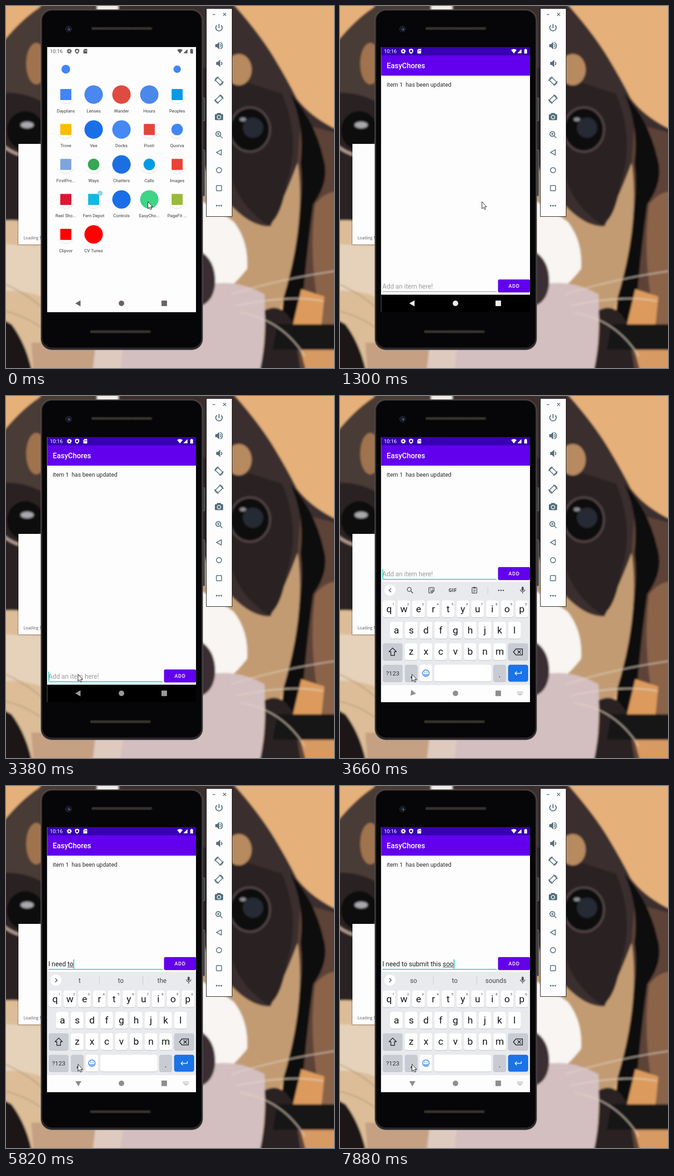
These frames come from a looping animation (713 px wide and 785 px high, 8 s). An HTML page:

```html
<!DOCTYPE html>
<html lang="en">
<head>
<meta charset="utf-8">
<title>To-do demo</title>
<style>
  html, body { margin: 0; width: 100%; height: 100%; overflow: hidden; background: #e6b07a; }
  svg { display: block; width: 713px; height: 785px; }
  text { font-family: Roboto, Arial, sans-serif; white-space: pre; }
  .mid { text-anchor: middle; }
  .bold { font-weight: 500; }
</style>
</head>
<body>
<svg id="stage" viewBox="0 0 713 785" xmlns="http://www.w3.org/2000/svg"></svg>
<script>
const LOOP = 8000;

// ---- markup helpers ----
const rect = (x, y, w, h, fill, r = 0, more = '') =>
  `<rect x="${x}" y="${y}" width="${w}" height="${h}" rx="${r}" fill="${fill}" ${more}/>`;
const disc = (x, y, r, fill, more = '') => `<circle cx="${x}" cy="${y}" r="${r}" fill="${fill}" ${more}/>`;
const oval = (x, y, rx, ry, fill, more = '') =>
  `<ellipse cx="${x}" cy="${y}" rx="${rx}" ry="${ry}" fill="${fill}" ${more}/>`;
const shape = (d, fill, more = '') => `<path d="${d}" fill="${fill}" ${more}/>`;
const line = (d, color, w = 1, more = '') => `<path d="${d}" fill="none" stroke="${color}" stroke-width="${w}" ${more}/>`;
const ring = (x, y, r, color, w, more = '') => disc(x, y, r, 'none', `stroke="${color}" stroke-width="${w}" ${more}`);
const text = (x, y, s, size, fill, more = '') => `<text x="${x}" y="${y}" font-size="${size}" fill="${fill}" ${more}>${s}</text>`;
const group = (id, ...parts) => `<g id="${id}">${parts.join('')}</g>`;
const at = (x, y, ...parts) => `<g transform="translate(${x} ${y})">${parts.join('')}</g>`;

// ---- wallpaper: flat tones of a dog's face ----
function wallpaper() {
  const black = '#0c0a0b', whisker = '#e6d8c6';
  return `<g filter="url(#soft)">` + [
    rect(-20, -20, 760, 830, '#e6b07a'),
    // left side of the head
    shape('M100-20L70 5Q25 35-20 95V480H100Z', '#4a3a35'),
    rect(75, -20, 125, 40, '#4a3a35'), rect(198, -20, 46, 40, '#f3ece6'), rect(244, -20, 188, 40, '#3a2d2a'),
    oval(66, 125, 22, 45, '#a0734f'),
    shape('M-20 190Q40 180 100 220V470H-20Z', '#2b2222'),
    oval(42, 270, 40, 42, black), oval(46, 258, 14, 7, '#a9a9ae'),
    line('M-10 300Q25 332 85 328', '#b59c90', 6),
    shape('M-20 468Q40 455 100 490V820H-20Z', '#dcbd98'),
    shape('M-20 515Q40 520 100 520V640Q40 610-20 620Z', '#e6d2ba'),
    shape('M-20 672L12 690Q50 740 62 820H-20Z', '#1c1716'),
    shape('M55 730H200V820H62Z', '#c5a082'), shape('M195 735H260L250 820H185Z', '#dfcabf'),
    // right side of the head
    shape('M420-20H480Q545 50 583 112Q612 160 632 200Q665 245 735 275V480H420Z', '#3a2e2d'),
    shape('M640 255L735 280V820H600Z', '#5d4338'),
    shape('M672 430Q700 395 735 405V700H690Q655 560 672 430Z', '#8b6348'),
    shape('M618 190Q650 260 640 340Q650 420 625 500Q602 600 598 705H640Q650 560 668 430Q705 380 690 330Q672 250 618 190Z', black),
    shape('M420 330Q500 480 575 478Q612 400 634 340Q648 440 622 560Q600 660 565 730L420 650Z', '#c29b72'),
    shape('M420 130Q520 165 600 190Q642 290 610 385Q598 460 570 475Q500 430 485 350L420 310Z', '#2a2122'),
    oval(506, 138, 28, 34, '#b78a61'),
    oval(530, 268, 44, 48, black, 'stroke="#54474a" stroke-width="4"'),
    disc(537, 264, 22, '#272a36'), oval(515, 246, 7, 4, '#8c8c96'),
    // muzzle, nose and collar
    shape('M420 420Q470 450 495 468Q528 510 524 570Q500 600 485 610L460 660H420Z', '#f8f5f2'),
    shape('M255 735H420V610Q490 585 562 625Q566 730 548 820H245Z', '#d3bfc0'),
    shape('M420 530Q456 550 455 600Q452 642 420 652Z', '#3b2d32'),
    shape('M562 660Q600 640 625 690L645 820H545Q568 730 562 660Z', '#2a2020'),
    shape('M642 614L692 630L686 690H624Z', '#dc9b5d'),
    shape('M590 690H735V745H580Z', '#191719'),
    shape('M640 746H735V820H660Z', '#d79a62'),
    line('M490 625Q600 590 735 572M500 650Q620 625 690 640M510 665Q600 680 650 760', whisker, 1.6),
    line('M-10 600Q40 620 80 655M-10 660Q40 670 80 700', '#a78a6e', 1.4)
  ].join('') + '</g>';
}

// ---- desktop windows around the handset ----
function sideWindow() {
  return rect(25, 299, 60, 220, '#00000030', 2) + rect(27, 299, 60, 218, '#fdfdfd') +
    text(38, 506, 'Loading N', 8.8, '#56565e', 'style="font-family:Open Sans,sans-serif"');
}

function toolbar() {
  const c = '#546e7a';
  const speaker = x => shape(`M${x} -3.2h3.6l5-5v16.4l-5-5h-3.6z`, c);
  const turn = dir => `<g transform="scale(${dir} 1)">` +
    rect(-4.2, -7.2, 8.4, 14.4, 'none', 1.2, `transform="rotate(-45)" stroke="${c}" stroke-width="1.7"`) +
    line('M-9.2 0A9.3 9.3 0 0 1-1-9.2M9.2 0A9.3 9.3 0 0 1 1 9.2', c, 1.5) + '</g>';
  const icons = [
    [47, line('M0-8V1M-4.6-5.2A7 7 0 1 0 4.6-5.2', c, 2)],
    [86, speaker(-8) + line('M2.5-3.2A3.6 3.6 0 0 1 2.5 3.2M2.5-7A7.4 7.4 0 0 1 2.5 7', c, 1.8)],
    [124.5, speaker(-6) + line('M4.4-3.2A3.6 3.6 0 0 1 4.4 3.2', c, 2)],
    [163, turn(1)], [202, turn(-1)],
    [240, rect(-9, -5.5, 18, 13, c, 2) + rect(-4.5, -8, 9, 4, c, 1.5) + ring(0, 1, 3.7, '#fdfdfd', 1.6)],
    [279, ring(-1.5, -1.5, 5.3, c, 1.9) + line('M2.5 2.5L7.5 7.5M-4-1.5h5M-1.5-4v5', c, 1.7)],
    [317.5, shape('M-5.5 0L5-5.8V5.8Z', 'none', `stroke="${c}" stroke-width="1.7" stroke-linejoin="round"`)],
    [356, ring(0, 0, 5.6, c, 1.7)],
    [395, rect(-5.6, -5.6, 11.2, 11.2, 'none', 1, `stroke="${c}" stroke-width="1.7"`)],
    [433, [-5, 0, 5].map(x => disc(x, 0, 1.8, c)).join('')]
  ];
  return rect(435.5, 5.5, 56, 451, '#fdfdfd', 0, 'stroke="#111"') +
    line('M449 18.5h6M472 15l6.4 6.4M478.4 15l-6.4 6.4', c, 1.4) +
    icons.map(([y, body]) => at(463, y, body)).join('');
}

function handset() {
  const grille = (x, y) => rect(x, y, 133, 7.5, '#1d1a19', 3) +
    line(`M${x + 2} ${y + 3.8}h129`, '#5a5048', 4.5, 'stroke-dasharray="1.2 1.6"');
  return rect(426, 199, 6, 50, '#3c3a3c', 1.5, 'stroke="#777"') + rect(426, 312, 6, 100, '#3c3a3c', 1.5, 'stroke="#777"') +
    rect(75.7, 7.7, 352, 738, '#2b282a', 24, 'stroke="#77717380" stroke-width="1.5"') +
    rect(79.5, 11, 344.5, 729, '#060507', 20, 'stroke="#000"') +
    disc(136, 50, 6.5, '#16161c', 'stroke="#2c2c33"') + disc(136.5, 50, 3, '#26345f') + disc(138, 51.5, 1, '#9aa7dd') +
    grille(185.5, 45) + grille(182.5, 702.5);
}

// ---- launcher; each entry is label, colour, kind (f full disc, d disc, s square) ----
const apps = ('Dayplans,4285f4,s|Lenses,4a87ee,f|Wander,df4b40,f|Hours,4c88ea,f|Peoples,039be5,s|' +
  'Trove,fbbc05,s|Vee,1a6fe8,f|Docks,4688f4,f|Postr,e5453a,s|Quorva,4285f4,d|' +
  'FirstPro...,7da5dc,s|Ways,34a853,d|Chatters,1a6fe3,f|Calls,039be5,d|Images,ea4335,s|' +
  'Reel Sho...,e21434,s|Fern Depot,10b9e2,s|Controls,1a6fe8,f|EasyCho...,3fd486,f|PageFit ...,99bb3c,s|' +
  'Clipvor,ff0000,s|CV Tunes,ff0000,f').split('|').map(s => s.split(','));

function launcher() {
  const tiles = apps.map(([label, color, kind], i) => {
    const x = 130 + 60.5 * (i % 5), y = 192 + 75.8 * Math.floor(i / 5), fill = '#' + color;
    const mark = kind === 'f' ? disc(0, 0, 20, fill) : kind === 'd' ? disc(0, 0, 12.5, fill) : rect(-12, -12, 24, 24, fill, 1);
    const edge = kind === 'f' ? '' : line('M-16.5 11A20 20 0 0 0 16.5 11', '#d8d8d8', 1);
    return at(x, y, `<g ${label.startsWith('EasyCho') ? 'id="pressed"' : ''}>${edge}${mark}</g>`,
      text(0, 38.6, label, 9.6, '#3a3a3a', 'class="mid"'));
  });
  return group('launcher', disc(130, 137, 9.5, '#4285f4'), disc(372, 137, 8, '#4285f4'),
    line('M125 154.5H375', '#ddd', 1, 'id="divider"'), ...tiles, disc(204.5, 406, 5.5, '#8dd3f3'));
}

function statusBar() {
  const c = 'currentColor';
  return group('status', text(95.5, 102, '10:16', 11.2, c),
    ring(137.5, 98, 2.9, c, 2.2), ring(137.5, 98, 4.6, c, 1.6, 'stroke-dasharray="2 1.6"'),
    shape('M154.5 92.5l4.6 1.8v3.5q0 3.8-4.6 5.7q-4.6-1.9-4.6-5.7v-3.5zM154.5 95.6a2.4 2.4 0 1 0 .1 0z', c, 'fill-rule="evenodd"'),
    shape('M171 93h5.4v10h-8.2v-7.2zM170.4 96v2h1v-2zM172.3 96v2h1v-2zM174.2 96v2h1v-2z', c, 'fill-rule="evenodd"'),
    shape('M372 95.5Q378 91 384 95.5L378 103Z', c),
    shape('M385.5 102.5L394.5 93.5V102.5Z', c), shape('M400.5 94.2h1.6v-1.2h2.8v1.2h1.6v8.8h-6z', c));
}

function navBar() {
  const c = 'currentColor';
  return group('nav', shape('M150.7 644.8L162 638.2V651.4Z', c, 'id="back"'),
    disc(251, 644.8, 6, c), rect(338, 638.8, 12, 12, c, 1),
    group('switcher', line('M385 641.5h12.5M385 644.5h12.5', c, 1.5, 'stroke-dasharray="1.5 1.25"'),
      line('M387.8 647.5h7', c, 1.5)));
}

// ---- keyboard ----
function keyboard() {
  const ink = '#15161a', soft = '#4d5156', grey = '#c8ccd2';
  const key = (x, y, w, fill = '#fff') => rect(x, y + 1, w, 36.5, '#b9bcc1', 4.5) + rect(x, y, w, 36.5, fill, 4.5);
  const row = (letters, x0, y) => [...letters].map((ch, i) => {
    const x = x0 + 32.05 * i;
    const hint = y < 450 ? text(x + 23, y + 10, (i + 1) % 10, 8, soft, 'class="mid"') : '';
    return key(x, y, 27.5) + hint + text(x + 13.8, y + 25, ch, 21, ink, 'class="mid letter"');
  }).join('');
  const tools = group('tools',
    line('M111 417l-4.2 4.2 4.2 4.2', soft, 1.6),
    ring(150.5, 419.5, 4.3, soft, 1.6), line('M153.8 422.8l4.8 4.8', soft, 1.8),
    line('M193 416.5q0-1 1-1h9.5q1 0 1 1v6l-4.5 4.5h-6q-1 0-1-1zM204.5 422h-4.5v5M196 422q2 3 4 1', soft, 1.4),
    disc(196.5, 419, 1, soft), disc(201, 419, 1, soft),
    text(245, 425, 'GIF', 10.5, soft, 'class="mid" font-weight="900" letter-spacing=".7"'),
    rect(287, 415.5, 10.5, 12, 'none', 1, `stroke="${soft}" stroke-width="1.4"`), rect(289.5, 414, 5.5, 3.5, soft, 1),
    line('M289.5 420.5h5.5M289.5 422.8h5.5M289.5 425h3.5', soft, 1),
    line('M321.5 413v17', '#c9ccd0'), ...[345, 350, 355].map(x => disc(x, 421.5, 1.6, soft)));
  const words = group('words', line('M107 417l4.2 4.2-4.2 4.2', soft, 1.6), line('M203 412v19M297.5 412v19', '#c4c7cb'),
    ...[160, 249.5, 339].map(x => text(x, 426.5, '', 14.1, '#45484c', 'class="mid word"')));
  return group('keyboard', rect(89, 403, 324, 224, '#e8eaed'), disc(108.5, 421, 12, '#fff'), tools, words,
    rect(394.7, 413.5, 4.6, 9, soft, 2.3), line('M392 419.5a5 5 0 0 0 10 0M397 424.5v4', soft, 1.4),
    row('qwertyuiop', 93, 443.5), row('asdfghjkl', 109, 489.8), row('zxcvbnm', 141, 536.2),
    key(93, 536.2, 43, grey), key(365.5, 536.2, 43.5, grey),
    shape('M114.5 546.5l8 8h-4v8h-8v-8h-4z', 'none', `id="shift" stroke="${ink}" stroke-width="1.4" stroke-linejoin="round"`),
    line('M377 555l5.5-6.5h14v13h-14zM386 551.5l7 7M393 551.5l-7 7', ink, 1.5),
    key(93, 582.8, 43, grey), key(141, 582.8, 27.5, grey), key(173, 582.8, 27.5), key(205, 582.8, 124),
    key(333.3, 582.8, 27.5, grey), key(365.5, 582.8, 43.5, '#1a73e8'),
    text(114.5, 606, '?123', 13.5, '#33363a', 'class="mid"'), text(155, 610, ',', 17, ink, 'class="mid"'),
    text(347, 610, '.', 17, ink, 'class="mid"'),
    ring(186.7, 601, 7, '#1a73e8', 1.5), disc(184.2, 599, 1.1, '#1a73e8'), disc(189.2, 599, 1.1, '#1a73e8'),
    line('M183 602.8a4 4 0 0 0 7.4 0', '#1a73e8', 1.5),
    line('M394 597v4.5h-13M384.5 597.5l-4 4 4 4', '#fff', 1.6));
}

function todoApp() {
  return group('app', rect(89, 89, 324, 575, '#fdfdfd'), rect(89, 89, 324, 18, '#3700b3'),
    rect(89, 626, 324, 38, '#000', 0, 'id="navBack"'),
    group('content', rect(89, 107, 324, 44, '#6200ee'), text(101.5, 135.4, 'EasyChores', 15.8, '#fff', 'class="bold"'),
      text(101.5, 175, 'item 1  has been updated', 12.55, '#2b2b2b'),
      group('entry', text(92, 613, 'Add an item here!', 14.1, '#9c9c9c', 'id="hint"'),
        text(92, 613, '', 14.15, '#1f1f1f', 'id="typed"'),
        rect(92, 614.3, 0, 1, '#333', 0, 'id="compose"'), rect(92.2, 598, 1.7, 20, '#12c7b4', 0, 'id="caret"'),
        rect(92.5, 619, 248, 1, '#8a8a8a', 0, 'id="rule"'),
        rect(344, 594, 69, 28, '#00000028', 3), rect(343.5, 593, 69.5, 28, '#6200ee', 3),
        text(378.6, 611.3, 'ADD', 11, '#fff', 'class="mid bold" letter-spacing="1"'))));
}

document.getElementById('stage').innerHTML =
  `<defs><filter id="soft" x="0" y="0" width="1" height="1"><feGaussianBlur stdDeviation="2"/></filter>
  <clipPath id="glass"><rect x="89.5" y="89" width="323.5" height="575"/></clipPath>
  <clipPath id="opening"><rect id="frame" rx="16"/></clipPath></defs>` +
  wallpaper() + sideWindow() + handset() + toolbar() +
  `<g clip-path="url(#glass)">` + rect(89, 89, 324, 575, '#fdfdfd') + launcher() +
  `<g id="splash" clip-path="url(#opening)">` + rect(89, 89, 324, 575, '#fff') +
  rect(89, 0, 324, 16, '#3700b3', 0, 'id="splashTop"') + rect(89, 0, 324, 60, '#000', 0, 'id="splashEnd"') + '</g>' +
  todoApp() + keyboard() + statusBar() + navBar() + '</g>' +
  shape('M.5 .5V15.5L3.8 12.5L6.2 17.5L8.5 16.5L6.3 11.5H10.8Z', '#fff', 'id="pointer" stroke="#111" stroke-width="1"');

// ---- motion ----
const el = {};
document.querySelectorAll('#stage [id]').forEach(n => el[n.id] = n);
const letters = [...document.querySelectorAll('.letter')];
const wordSlots = [...document.querySelectorAll('.word')];
const set = (node, attrs) => { for (const k in attrs) node.setAttribute(k, attrs[k]); };
const show = (node, on) => { node.style.display = on ? '' : 'none'; };
const mix = (a, b, p) => a + (b - a) * p;
// progress 0..1 that advances in n even jumps between two times
const steps = (t, from, to, n) => t < from ? 0 : Math.min(n, Math.floor((t - from) / ((to - from) / (n - 1)) + 1e-6) + 1) / n;
const latest = (list, t) => list.filter(s => s[0] <= t).pop();

// time, x, y, width, height, bottom bar, opacity
const opening = [[490, 262, 350, 90, 130, 2, .5], [650, 117, 153, 277, 470, 8, 1], [800, 98, 106, 306, 540, 28, 1]];
const typing = [
  [4980, 'I', "I|I'm|I'll"], [5100, 'I n', 'n|I|not'], [5220, 'I ne', 'ne|need|never'], [5340, 'I nee', 'need|never|new'],
  [5460, 'I need', 'need|needed|needs'], [5580, 'I need ', 'to|a|you'], [5700, 'I need t', 'to|a|you'],
  [5820, 'I need to', 't|to|the'], [5940, 'I need to', 'to|too|top'], [6060, 'I need to ', 'be|get|go'],
  [6310, 'I need to s', 's|see|some'], [6430, 'I need to su', 'su|sure|such'], [6550, 'I need to sub', 'sub|subs|such'],
  [6800, 'I need to subm', 'subm|submit|submits'], [6920, 'I need to submi', 'submit|submits|submitted'],
  [7040, 'I need to submit', 'submit|submits|submitted'], [7160, 'I need to submit t', 'to|a|the'],
  [7280, 'I need to submit th', 'th|the|this'], [7400, 'I need to submit thi', 'thi|this|thing'],
  [7520, 'I need to submit this', 'this|thus|things'], [7640, 'I need to submit this ', 'to|form|is'],
  [7760, 'I need to submit this so', 's|so|to'], [7880, 'I need to submit this soo', 'so|to|sounds']
];

function movePointer(t) {
  const a = steps(t, 1660, 2260, 6), b = steps(t, 2630, 2870, 3), c = steps(t, 3020, 3140, 2);
  const x = mix(mix(mix(308, 218, a), 159, b), 156, c);
  const y = mix(mix(mix(424, 291, a), 572, b), 603, c);
  set(el.pointer, { transform: `translate(${Math.round(x)} ${Math.round(y)})` });
}

function drawLauncher(t) {
  show(el.launcher, t < 920);
  show(el.divider, t >= 650);
  const [alpha, lift] = t < 490 ? [1, 0] : t < 650 ? [.75, 0] : t < 800 ? [.3, -32] : [.1, -40];
  set(el.launcher, { opacity: alpha, transform: `translate(0 ${lift})` });
  set(el.pressed, { transform: `scale(${t < 120 ? 1 : 1.06})`, opacity: t < 240 ? 1 : .85 });
  const s = latest(opening, t);
  show(el.splash, s && t < 920);
  if (!s) return;
  const [, x, y, width, height, bar, opacity] = s;
  set(el.frame, { x, y, width, height });
  set(el.splash, { opacity });
  set(el.splashTop, { y, height: 18.5 * width / 324 });
  set(el.splashEnd, { y: y + height - bar });
}

function drawEntry(t, raised) {
  const focus = t >= 3260;
  const now = latest(typing, t);
  const s = now ? now[1] : '';
  const start = s.lastIndexOf(' ') + 1;
  el.typed.textContent = s;
  show(el.hint, !s);
  const width = s ? el.typed.getComputedTextLength() : 0;
  const before = start ? el.typed.getSubStringLength(0, start) : 0;
  set(el.compose, { x: 92 + before, width: Math.max(0, width - before) });
  set(el.caret, { x: 92.2 + width });
  show(el.caret, focus && !(t >= 4330 && t < 4830));
  set(el.rule, focus ? { y: 618.8, height: 1.6, fill: '#12c7b4' } : { y: 619, height: 1, fill: '#8a8a8a' });
  set(el.entry, { transform: `translate(0 ${raised ? -222 : 0})` });
  show(el.tools, !now);
  show(el.words, now);
  if (now) now[2].split('|').forEach((w, i) => { wordSlots[i].textContent = w; });
}

function drawKeyboard(t, raised) {
  show(el.keyboard, raised);
  set(el.keyboard, t < 3660 ? { transform: 'translate(0 60)', opacity: .7 } : { transform: '', opacity: 1 });
  const caps = t >= 4830 && t < 4980;
  letters.forEach(n => {
    const ch = n.textContent;
    n.textContent = caps ? ch.toUpperCase() : ch.toLowerCase();
  });
  set(el.shift, { fill: caps ? '#15161a' : 'none' });
}

function drawBars(t, raised) {
  const open = t >= 920;
  show(el.status, t < 650 || open);
  show(el.nav, t < 650 || open);
  el.status.style.color = open ? '#fff' : '#5c5c60';
  const v = Math.round(mix(236, 153, steps(t, 1660, 2260, 6)));
  el.nav.style.color = !open ? '#6b6266' : raised ? '#8e8e8e' : t < 1300 ? '#bbb' : `rgb(${v},${v},${v})`;
  set(el.navBack, { fill: raised ? '#fdfdfd' : '#000' });
  const angle = t < 3540 ? 0 : t < 3660 ? -15 : t < 3780 ? -52 : -90;
  set(el.back, { transform: `rotate(${angle} 157.3 644.8)` });
  show(el.switcher, raised);
}

function draw(t) {
  const raised = t >= 3540;
  movePointer(t);
  drawLauncher(t);
  show(el.app, t >= 920);
  show(el.content, t >= 1300);
  drawEntry(t, raised);
  drawKeyboard(t, raised);
  drawBars(t, raised);
}

const begin = performance.now();
function tick() {
  draw((performance.now() - begin) % LOOP);
  requestAnimationFrame(tick);
}
tick();
</script>
</body>
</html>
```
